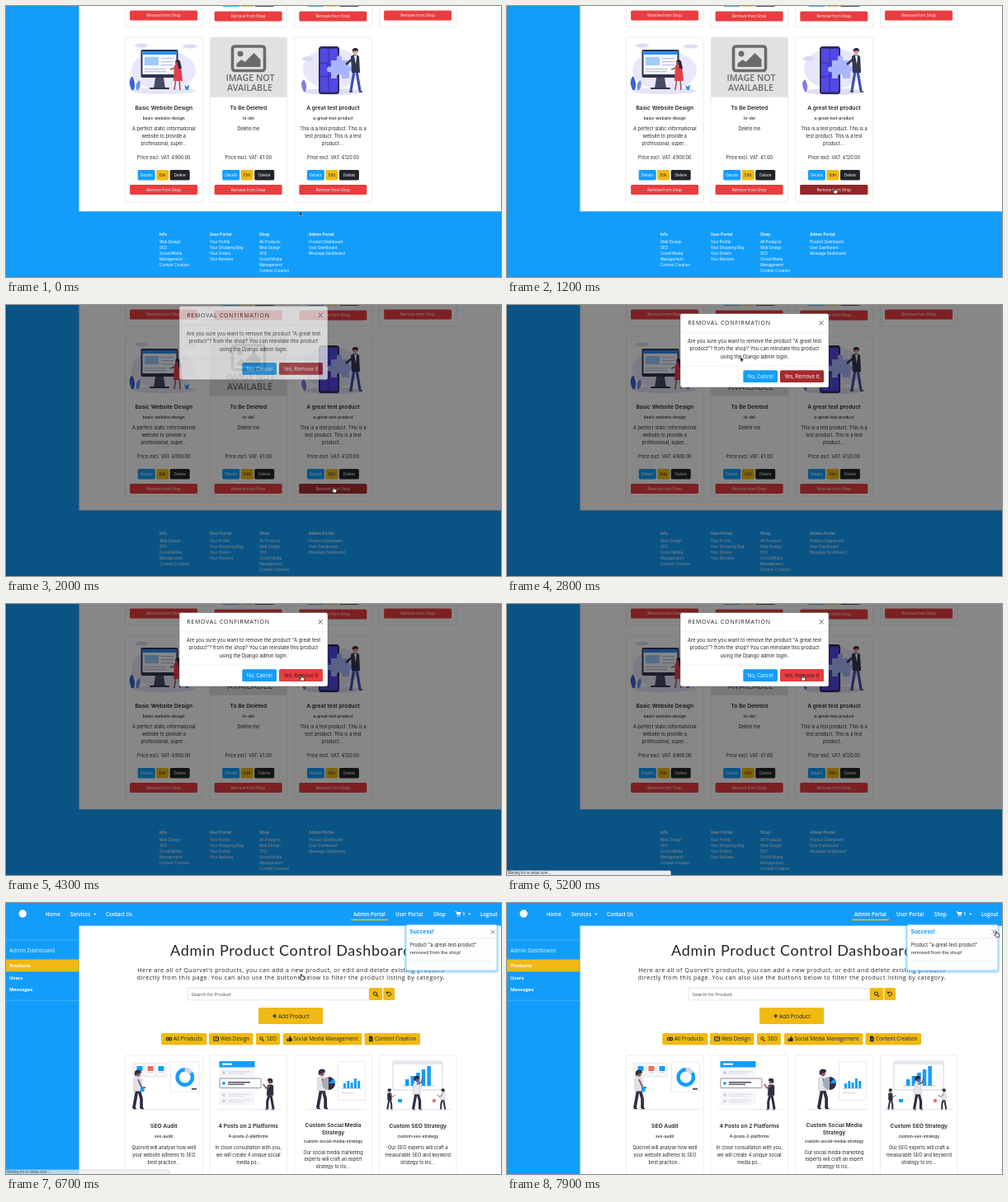
An HTML page that plays this animation: 600x329 px, repeating every 8000 ms.

```html
<!DOCTYPE html>
<html lang="en">
<head>
<meta charset="utf-8">
<title>Product dashboard</title>
<style>
html, body { margin: 0; width: 100%; height: 100%; overflow: hidden; background: #fff; }
svg { display: block; width: 100vw; height: 100vh; }
text { font-family: Inter, Roboto, sans-serif; white-space: pre; }
.os { font-family: "Open Sans", "Noto Sans", sans-serif; }
.head { font-family: Lato, sans-serif; }
.status { font-family: "Liberation Sans", sans-serif; }
</style>
</head>
<body>
<svg id="stage" viewBox="0 0 600 329" preserveAspectRatio="none"></svg>
<script>
const BLUE = '#139dfb', GOLD = '#f0b913', RED = '#e93d40', DARK = '#212529', MAROON = '#a62a2d', INK = '#2f2e41';
const LOOP = 8000, COLUMNS = [144.5, 247, 349.7, 452.5], CARD_W = 93.6;

const rect = (x, y, w, h, fill, r = 0, more = '') =>
  `<rect x="${x}" y="${y}" width="${w}" height="${h}" rx="${r}" fill="${fill}" ${more}/>`;
const circle = (x, y, r, fill, more = '') => `<circle cx="${x}" cy="${y}" r="${r}" fill="${fill}" ${more}/>`;
const oval = (x, y, rx, ry, fill) => `<ellipse cx="${x}" cy="${y}" rx="${rx}" ry="${ry}" fill="${fill}"/>`;
const shape = (d, fill, more = '') => `<path d="${d}" fill="${fill}" ${more}/>`;
const line = (d, color, width = 1, more = '') =>
  `<path d="${d}" fill="none" stroke="${color}" stroke-width="${width}" ${more}/>`;
const text = (x, y, s, size, { mid, bold = 400, fill = DARK, cls = '', gap = 0 } = {}) =>
  `<text x="${x}" y="${y}" font-size="${size}" font-weight="${bold}" fill="${fill}" class="${cls}"` +
  ` letter-spacing="${gap}" ${mid ? 'text-anchor="middle"' : ''}>${s}</text>`;
const group = (id, body) => `<g id="${id}">${body}</g>`;
const outline = (color, width = .6) => `stroke="${color}" stroke-width="${width}"`;

const button = (x, y, w, h, label, size, fill, color) =>
  rect(x, y, w, h, fill, 1.6) +
  text(x + w / 2, y + h / 2 + size * .36, label, size, { mid: true, fill: color, cls: 'os' });
const removeButton = (x, y, fill = RED) => button(x + 5.6, y, 82, 12, 'Remove from Shop', 4.7, fill, '#fff');
const actions = (x, y) =>
  button(x + 15.2, y, 21, 12.4, 'Details', 4.7, BLUE, '#fff') +
  button(x + 37.7, y, 15, 12.4, 'Edit', 4.7, GOLD, DARK) +
  button(x + 54.2, y, 24, 12.4, 'Delete', 4.7, DARK, '#fff');
const frame = (x, y, h) => rect(x, y, CARD_W, h, '#fff', 1.8, outline('#dfdfdf'));

function copy(x, titles, titleY, slug, slugY, lines, bodyY) {
  const c = x + CARD_W / 2;
  return titles.map((s, i) => text(c, titleY + i * 9.2, s, 6.7, { mid: true, bold: 600 })).join('') +
    text(c, slugY, slug, 4.9, { mid: true, bold: 500 }) +
    lines.map((s, i) => text(c, bodyY + i * 8.8, s, 5.6, { mid: true })).join('');
}

function monitorArt() {
  return oval(191, 78, 39, 24, '#e9e8fb') + oval(191, 103, 39, 4, '#e4e3f8') +
    oval(164, 48, 8, 2.4, '#dcdcf3') + oval(223, 49, 9, 2.6, '#dcdcf3') +
    rect(163.5, 53, 45, 34, '#30344d', 2) + rect(165.5, 55, 41, 28, '#f7f8ff') +
    rect(165.5, 55, 41, 4, '#2f8df5') + rect(168, 62, 17, 10, '#9dcbfa') +
    [63, 67, 71, 76, 79].map((y, i) => rect(i < 3 ? 188 : 168, y, i < 3 ? 15 : 26, 1.2, '#b9bfe0')).join('') +
    shape('M181 87h10l2 13h-14z', '#464b68') + rect(174, 99, 24, 2, '#30344d', 1) +
    shape('M152 102q-5-12 1-17q5 9 2 17z', '#3a62d7') + shape('M158 102q-2-9 4-12q2 8-2 12z', '#6d90ee') +
    line('M206 88l-2 14M210 88l1 14', '#9b5a54', 1.6) +
    shape('M204 72q4-3 8 0l2 19h-11z', '#e23f49') + line('M205 75l-6 2', '#9b5a54', 1.6) +
    circle(207.5, 69, 2.6, '#9b5a54') + shape('M205 67q3-4 6 0l2 9h-4l-1-7z', '#2a2440') +
    shape('M218 102l-2-6 3 2 3-3-1 7z', '#2f8df5');
}

function missingArt() {
  const grey = '#6b6b6b', style = { mid: true, bold: 600, fill: grey, cls: 'os' };
  return rect(247.2, 38.3, 93.2, 72.4, '#e1e1e1') +
    rect(274.5, 49, 39, 29.5, 'none', 3, outline(grey, 3.6)) +
    circle(284, 58, 3.5, grey) + shape('M279.5 74v-4l6-5 4 3 11-11 8 8v9z', grey) +
    text(296, 90.6, 'IMAGE NOT', 10.7, style) + text(295.5, 102.8, 'AVAILABLE', 10.7, style);
}

function puzzleArt() {
  return oval(395, 76, 35, 25, '#e7e6fb') + oval(366, 64, 7, 3, '#d9d8f5') + oval(396, 104, 36, 4, '#dfdef6') +
    rect(379, 49, 25, 58, '#2d2b52', 3.5) + rect(380.8, 51.5, 21.4, 53, '#5148e5', 2) +
    rect(387, 50, 9, 2, '#2d2b52', 1) +
    line('M391 53v15q-4 4 0 7v28M381 69h8q3 4 6 0h7M381 86h8q3-4 6 0h7', '#2d2b80', .8) +
    shape('M394 66h7q-1-6 3-6t3 6h9v8q6-2 6 2t-6 3v9h-9q1-5-3-5t-3 5h-7v-8q-5 1-5-3t5-3z', '#a9b6ff') +
    line('M422 79l-4 24M425 79l4 24', '#3e50b0', 3.2) + line('M416 104h4M428 104h4', '#25233d', 1.6) +
    shape('M418 61q5-4 10 0l1 20h-10z', '#33384f') + line('M420 64l-8 7', '#33384f', 2.5) +
    shape('M422 60l3 0-1 11z', '#fff') + circle(423, 55.5, 2.9, '#d99d89') +
    shape('M419.6 55q0-4 4-4t3.2 5l-1.6-2z', '#2a2440') +
    shape('M361 104q-6-10 0-15 5 8 2 15z', '#7d7ae8');
}

const upperRow = COLUMNS.map((x, i) => {
  const y = i === 1 || i === 2 ? 6.6 : 5.6;
  return frame(x, -10, 35.6) + actions(x, y - 18.2) + removeButton(x, y);
}).join('');

const shopCards = [
  ['Basic Website Design', 'basic-website-design', 'A perfect static informational|website to provide a|professional, super...', '900'],
  ['To Be Deleted', 'to-del', 'Delete me', '1'],
  ['A great test product', 'a-great-test-product', 'This is a test product. This is a|test product. This is a test|product....', '120']
].map(([title, slug, body, price], i) => {
  const x = COLUMNS[i];
  return frame(x, 38, 200) + copy(x, [title], 125.7, slug, 137.9, body.split('|'), 151.2) +
    text(x + CARD_W / 2, 186, `Price excl. VAT: €${price}.00`, 5.55, { mid: true }) +
    actions(x, 199) + removeButton(x, 217);
}).join('');

const footer = [
  [186, 'Info', 'Web Design|SEO|Social Media|Management|Content Creation'],
  [246.7, 'User Portal', 'Your Profile|Your Shopping Bag|Your Orders|Your Reviews'],
  [307, 'Shop', 'All Products|Web Design|SEO|Social Media|Management|Content Creation'],
  [367, 'Admin Portal', 'Product Dashboard|User Dashboard|Message Dashboard']
].map(([x, title, items]) => text(x, 278.8, title, 4.9, { bold: 600, fill: '#fff' }) +
  items.split('|').map((s, i) => text(x, 288 + i * 6.9, s, 4.5, { fill: '#fff' })).join('')).join('');

const shopPage = rect(0, 0, 600, 329, BLUE) + rect(88.6, 0, 511.4, 249.3, '#fff') +
  rect(88.6, 0, .8, 249.3, '#d5dde3') + upperRow + shopCards +
  missingArt() + monitorArt() + puzzleArt() +
  group('removeHover', removeButton(COLUMNS[2], 217, '#922629')) + footer;

const modal = rect(210, 10.5, 180, 89.5, '#fff', 2.2, outline('#555', .4)) +
  text(219.3, 24.3, 'REMOVAL CONFIRMATION', 7, { cls: 'os', gap: .75 }) +
  line('M378.6 19l5.2 5.4m0-5.4l-5.2 5.4', '#555', .9) +
  line('M210 33.4h180M210 74.2h180', '#dee2e6', .5) +
  ['Are you sure you want to remove the product "A great test',
    'product"? from the shop? You can reinstate this product',
    'using the Django admin login.'].map((s, i) => text(300, 46 + i * 9.4, s, 5.93, { mid: true })).join('') +
  button(286.3, 79.3, 41.7, 14.8, 'No, Cancel', 6.3, BLUE, '#fff') +
  button(331, 79.3, 53, 14.8, 'Yes, Remove It', 6.3, MAROON, '#fff') +
  group('yesHover', button(331, 79.3, 53, 14.8, 'Yes, Remove It', 6.3, RED, '#3a1518'));

// Standing figure with its head at (x, y), facing right (1) or left (-1)
function person(x, y, height, facing, shirt, arm = 'l6 7 6-4') {
  const k = height / 45;
  return `<g transform="translate(${x} ${y}) scale(${k * facing} ${k})">` +
    line('M-1 22l-2 11-2 11M1 22l3 11 0 11', INK, 3.6, 'stroke-linejoin="round"') +
    line('M-6 44.5h4M3 44.5h4', '#24232f', 1.4) +
    shape('M-5 9q5-3 9 0l1 15h-10z', shirt, outline('#8d8d99', .3)) +
    line(`M0 10${arm}`, '#8c5660', 1.8) +
    circle(0, 4, 2.7, '#8c5660') + shape('M-3.6 6q-2-7 3-7.500q5 0 4.400 4l-4 .5z', INK) + '</g>';
}

const bars = (x, base, heights, w, gap) =>
  heights.map((h, i) => rect(x + i * gap, base - h, w, h, BLUE)).join('');

const listRow = (y, mark, ink) => circle(264, y, 1.9, mark) +
  rect(269, y - 1.7, 27, 1.3, ink) + rect(269, y + .8, 20, 1.1, ink);

const dashboardArt = [
  rect(153, 193.500, 42, 18.5, '#f1f1f4') + [157, 170, 183].map((x, i) => rect(x, 196, 10, 12.5, '#fff') +
    rect(x + 1.5, 198, 7, 6, i === 1 ? '#ef6a6d' : BLUE) + rect(x + 1.5, 205.5, 7, 1, '#c8c8d2')).join('') +
    rect(199.500, 193, 34.5, 36, '#fff', 1, outline('#dcdce4')) +
    circle(216.8, 211.5, 9.2, 'none', outline(BLUE, 4.4)) +
    line('M216.8 202.3a9.2 9.2 0 0 1 7.5 4', '#d3d6e0', 4.4) + rect(225, 225, 6, 1.5, INK) +
    person(160, 204, 46, 1, '#e2e2e8', 'l4 9 5 1') + rect(163, 223, 4.500, 6, BLUE, .5),
  rect(258.500, 192, 43, 26, '#f5f6f9') + rect(258.500, 192, 43, 7.5, BLUE) + rect(262, 194.600, 12, 2, '#fff') +
    listRow(206, '#c5cad6', '#d5d8e0') +
    rect(259, 213, 50, 11.5, '#fff', .5, outline('#4d4c5c')) + listRow(218.8, BLUE, INK) +
    rect(258.500, 229, 43, 16, '#f5f6f9') + listRow(233, '#d0d4dd', '#dde0e6') + listRow(240.500, '#d0d4dd', '#dde0e6') +
    person(320, 214, 37, -1, INK, 'l6 3 4-6'),
  rect(402.500, 192.500, 33, 47, '#fff', 1, outline('#dcdce4')) +
    bars(409, 225, [6, 9, 7, 12, 9], 3, 4.3) + line('M407 225.500h24', '#b7b7c3', .5) +
    rect(407, 230, 15, 1, '#d0d0da') + person(383, 203, 47, 1, '#e2e2e8', 'l4 9 5 1') +
    shape('M391 211a8 8 0 0 0 0 16z', '#a9abba') + shape('M391 211a8 8 0 0 1 0 16z', INK) +
    shape('M391 219l5.7-5.7a8 8 0 0 1 2.3 5.7z', BLUE),
  rect(469, 192, 60, 35, '#fff', 1, outline('#c9c9d5', .8)) + rect(469, 192, 60, 4, '#e6e6ec') +
    bars(484, 222, [8, 12, 16, 20, 24], 4.5, 6.6) + line('M480 222h40', '#9a9aa8', .5) +
    person(498, 211, 40, 1, '#e6e6ec', 'l6-2 2-7') +
    person(465, 226, 25, 1, INK) + person(529.500, 226, 25, -1, '#e6e6ec') +
    rect(475, 238, 5, 4, BLUE) + circle(519, 240, 2.2, '#ef6a6d')
].join('') + line('M151 250.500h84M256 250.500h78M364 250.500h72M458 250.500h82', '#cfcfd8', .5);

const dashboardCards = [
  [['SEO Audit'], 'seo-audit', 'Quorvel will analyse how well|your website adheres to SEO|best practice...'],
  [['4 Posts on 2 Platforms'], '4-posts-2-platforms', 'In close consultation with you,|we will create 4 unique social|media po...'],
  [['Custom Social Media', 'Strategy'], 'custom-social-media-strategy', 'Our social media marketing|experts will craft an expert|strategy to inc...'],
  [['Custom SEO Strategy'], 'custom-seo-strategy', 'Our SEO experts will craft a|measurable SEO and keyword|strategy to inc...']
].map(([titles, slug, body], i) => {
  const two = titles.length > 1;
  return frame(COLUMNS[i], 185, 200) +
    copy(COLUMNS[i], titles, two ? 271.8 : 273.4, slug, two ? 291 : 285.2, body.split('|'), two ? 304.5 : 299.2);
}).join('');

const nav = [[48, 'Home'], [78, 'Services'], [121, 'Contact Us'], [421, 'Admin Portal'], [472, 'User Portal'], [518, 'Shop'], [575, 'Logout']]
  .map(([x, s]) => text(x, 16, s, 6.15, { bold: 600, fill: '#fff', cls: 'os' })).join('') +
  shape('M106 12.8h3.6l-1.8 2z', '#fff') + shape('M560 12.8h3.6l-1.8 2z', '#fff') +
  text(553.5, 15, '0', 4.8, { bold: 600, fill: '#fff', cls: 'os' }) +
  shape('M544.5 10h1.5l.5 1h5l-1 3.6h-3.4z', '#fff') + circle(547.3, 16, .7, '#fff') + circle(550, 16, .7, '#fff') +
  rect(418, 19.6, 45, 1.6, GOLD) + circle(20.2, 13, 4.7, '#fff');

const sidebar = rect(0, 27, 88.6, 302, BLUE) + line('M0 45.2h88.6M0 118.2h88.6', '#67c0fc', .6) +
  line('M0 68.3h88.6M0 83.3h88.6', '#8fcdfb', .7, 'stroke-dasharray="1 1"') +
  text(4, 60, 'Admin Dashboard', 6.5, { fill: '#e8f5ff', cls: 'os' }) + rect(0, 68.8, 88.6, 14.2, GOLD) +
  ['Products', 'Users', 'Messages'].map((s, i) =>
    text(4, 78.2 + i * 14.5, s, 5.9, { bold: 700, fill: '#fff', cls: 'os' })).join('');

const icons = [
  line('M197.6 165a1.6 1.6 0 1 1-3.2 0a1.6 1.6 0 1 1 3.2 0a1.6 1.6 0 1 1 3.2 0a1.6 1.6 0 1 1-3.2 0', DARK, 1.2),
  rect(251.6, 162.6, 6, 4.6, 'none', .4, outline(DARK, 1)) + line('M252.500 166.200l2-2 1.300 1 1.500-1.500', DARK, .8),
  circle(309.4, 164.4, 1.7, 'none', outline(DARK, .9)) + line('M310.7 165.8l2 2', DARK, 1.1),
  rect(340.6, 164.6, 1.5, 3.4, DARK) + shape('M342.6 164.6l1.7-3 1 .5-.3 1.9h1.8l-.5 4h-3.7z', DARK),
  shape('M440 161.6h3l1.6 1.6v5h-4.6z', DARK) + line('M441 165h2.6m-2.6 1.4h2.6', GOLD, .5)
];
const filters = [[188.3, 55, 'All Products', 203], [246, 53.5, 'Web Design', 260], [303, 29, 'SEO', 316], [336, 95.5, 'Social Media Management', 348.500], [434.5, 67.5, 'Content Creation', 447]]
  .map(([x, w, label, tx], i) => rect(x, 158, w, 14.2, GOLD, 1.6) + icons[i] +
    text(tx, 167.4, label, 6.35, { cls: 'os', bold: 500 })).join('');

const intro = ["Here are all of Quorvel's products, you can add a new product, or edit and delete existing products",
  'directly from this page. You can also use the buttons below to filter the product listing by category.']
  .map((s, i) => text(345.5, 84.1 + i * 8.4, s, 7.1, { mid: true, bold: 500, cls: 'os', gap: .49 })).join('');

const dashboard = rect(0, 0, 600, 329, '#fff') + rect(0, 0, 600, 27.6, BLUE) + nav + sidebar +
  text(345.5, 64.4, 'Admin Product Control Dashboard', 18, { mid: true, cls: 'head', gap: .67 }) + intro +
  rect(220, 103.3, 220, 14.5, '#fff', 1.4, outline('#cfd4da')) +
  text(224.5, 112.6, 'Search for Product', 5.45, { fill: '#495057' }) +
  rect(440, 103, 16.2, 15, GOLD, 1.2) + rect(457.3, 103, 13.7, 15, GOLD, 1.2) +
  circle(447.4, 110, 2, 'none', outline(DARK, 1)) + line('M449 111.6l2 2', DARK, 1.2) +
  line('M462 109.3a2.4 2.4 0 1 1 .3 2.7', DARK, .9) + shape('M461 107v3h3z', DARK) +
  rect(306, 127, 78.2, 20, GOLD, 1.8) + line('M323.2 137.2h5m-2.5-2.5v5', DARK, 1.2) +
  text(330, 139.6, 'Add Product', 6.5, { cls: 'os', bold: 500 }) + filters + dashboardCards + dashboardArt;

const glow = [3, 2, 1].map(r =>
  rect(485 - r, 27.4 - r, 110 + 2 * r, 55.4 + 2 * r, '#4aaef5', 2 + r, 'opacity=".17"')).join('');
const toast = glow + rect(485, 26.4, 110, 55.4, '#fff', 2, outline('#8ccbf9') + ' fill-opacity=".96"') +
  text(489.5, 37.4, 'Success!', 7.1, { bold: 700, fill: BLUE, cls: 'os' }) +
  line('M587.4 32.4l5 5m0-5l-5 5', '#777', .8) + line('M485 43h110M489.5 71h101', '#dde1e4', .6) +
  text(489.8, 53.2, 'Product "a-great-test-product"', 5.5) + text(489.8, 61.9, 'removed from the shop!', 5.45);

const status = rect(-2, 323.8, 200.5, 7, '#ececec', 1.5, outline('#bbb', .5)) +
  text(1, 328.3, 'Waiting for m.stripe.com...', 4.5, { fill: '#333', cls: 'status' });

const cursor = group('arrow', shape('M0 0v5.6l1.3-1.2.9 2 1-.4-.9-2h1.8z', '#000', outline('#fff', .4))) +
  group('hand', shape('M-.6-2.4q.7-.8 1.3 0v2.2l2.6.6q.8.3.6 1.3l-.6 2.7h-3.4l-2.3-2.6q.2-1 1.3-.4l.5.4z',
    '#fff', outline('#000', .7) + ' stroke-linejoin="round"'));

document.getElementById('stage').innerHTML =
  group('shop', shopPage + rect(0, 0, 600, 329, '#000', 0, 'id="backdrop"') + group('modal', modal)) +
  group('dashboard', dashboard + group('toast', toast)) + group('status', status) + group('cursor', cursor);

const el = id => document.getElementById(id);
const ramp = (t, start, length) => Math.min(1, Math.max(0, (t - start) / length));
const smooth = k => k * k * (3 - 2 * k);
const fade = (id, k) => el(id).setAttribute('opacity', k);
const show = (id, on) => el(id).setAttribute('display', on ? 'inline' : 'none');

// [start, duration, x, y]: each move ends at the given point
const moves = [[250, 850, 397, 223.5], [2000, 700, 283, 63], [2900, 700, 358, 89], [6900, 650, 593, 37]];
function cursorAt(t) {
  return moves.reduce(([x, y], [start, length, tx, ty]) => {
    const k = smooth(ramp(t, start, length));
    return [x + (tx - x) * k, y + (ty - y) * k];
  }, [355.5, 249]);
}

function update(t) {
  const loaded = t >= 6200;
  show('shop', !loaded);
  show('dashboard', loaded);
  fade('removeHover', ramp(t, 850, 150) - ramp(t, 1950, 150));
  fade('backdrop', .47 * ramp(t, 1760, 160));
  const slide = ramp(t, 1900, 300);
  fade('modal', ramp(t, 1900, 150));
  el('modal').setAttribute('transform', `translate(0 ${-21 * (1 - slide) ** 2})`);
  fade('yesHover', ramp(t, 3350, 150));
  fade('toast', ramp(t, 6200, 150));
  show('status', t >= 4400 && t < 6900);
  fade('status', 1 - ramp(t, 6650, 200));
  const [x, y] = cursorAt(t);
  el('cursor').setAttribute('transform', `translate(${x} ${y})`);
  const hand = t >= 850 && t < 2050 || t >= 3350 && t < 6950 || t >= 7480;
  show('hand', hand);
  show('arrow', !hand);
}

function tick() {
  update(performance.now() % LOOP);
  requestAnimationFrame(tick);
}
tick();
</script>
</body>
</html>
```
